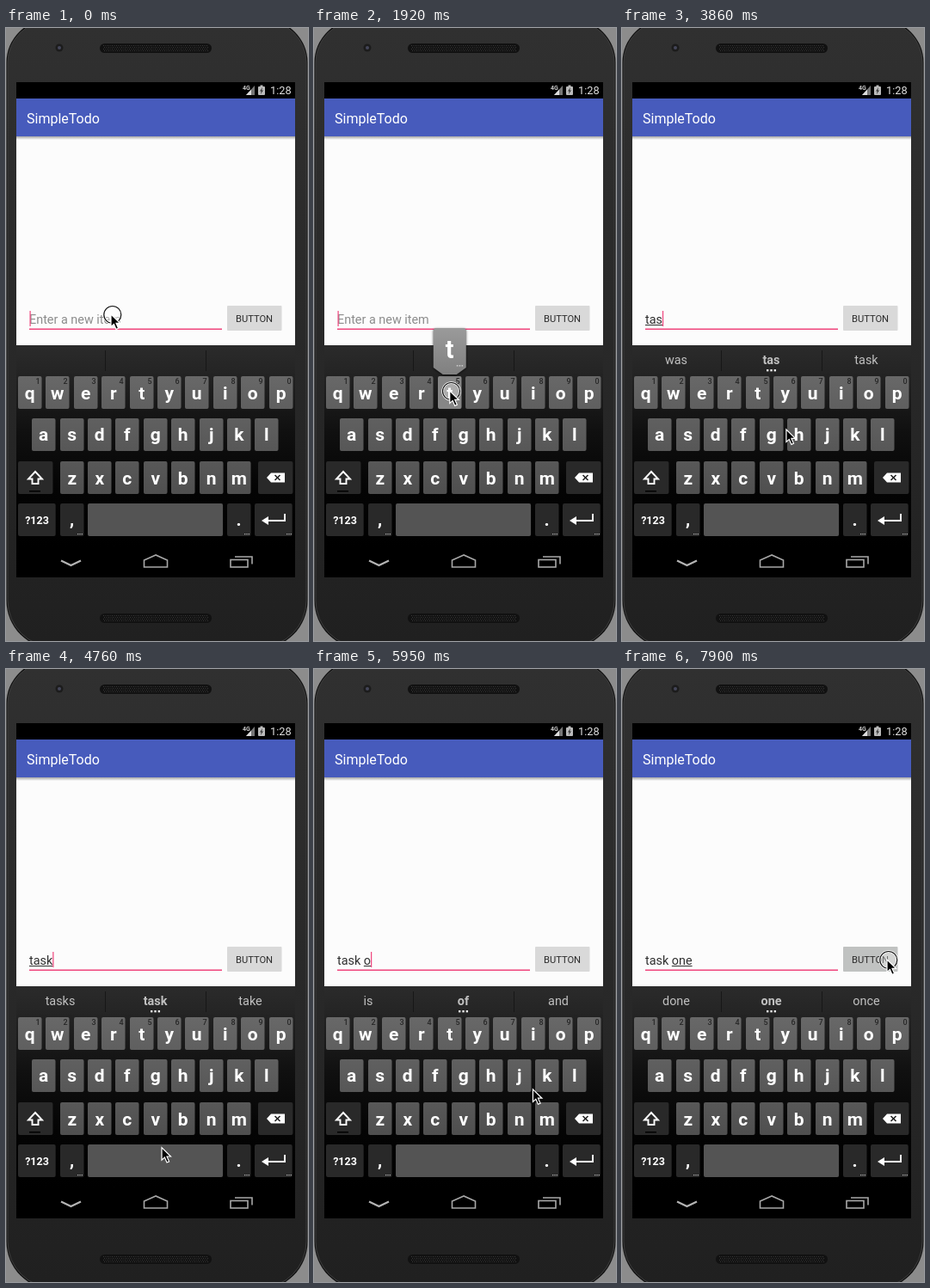
An HTML page with a canvas for the animation above (8 s loop, 351x713 px).

```html
<!DOCTYPE html>
<html lang="en">
<head>
<meta charset="utf-8">
<title>Todo entry</title>
<style>
html, body { margin: 0; width: 351px; height: 713px; overflow: hidden; background: #8c8c8c; }
canvas { display: block; }
</style>
</head>
<body>
<canvas id="stage" width="351" height="713"></canvas>
<script>
const c = document.getElementById('stage').getContext('2d');
const LOOP = 8000, STEP = 149, LAST = 53;
const PITCH = 32.4, KEY_W = 27.5, KEY_H = 38;
const PINK = '#f0447c', INK = '#303030';

// Pointer stops; those between whole steps leave no visible press.
const stops = [
  [0, 'field'], [8.5, 'rest'], [13, 't'], [20, 'a'], [25, 's'], [29, 'k'],
  [33, ' '], [39, 'o'], [41.8, 'n'], [47, 'e'], [51.5, 'past'], [53, 'button']
];
const spots = { field: [122, 333], rest: [115, 489], past: [332, 337], button: [308, 338] };
const suggestions = {
  '': '', t: 'the t to', ta: 'to ta at', tas: 'was tas task', task: 'tasks task take',
  'task ': 'is of and', 'task o': 'is of and', 'task on': 'in on one', 'task one': 'done one once'
};

const keyX = col => Math.round(14 + col * PITCH);
const keyY = row => Math.floor(405 + row * 49.5);
const spanW = span => (span - 1) * PITCH + KEY_W;

const letters = ['qwertyuiop', 'asdfghjkl', 'zxcvbnm'].flatMap((chars, row) =>
  [...chars].map((char, i) => ({ char, row, i, x: keyX((10 - chars.length) / 2 + i), y: keyY(row) })));

// Lower rows are touched nearer to their top edge.
const aim = (x, row) => [x + 2 * row, keyY(row) + 17 - 4 * row];
for (const k of letters) spots[k.char] = aim(k.x + KEY_W / 2, k.row);
spots[' '] = aim(keyX(2.5) + spanW(5) / 2, 3);

function box(x, y, w, h, fill, r = 0) {
  c.fillStyle = fill;
  c.beginPath();
  c.roundRect(x, y, w, h, r);
  c.fill();
}
function poly(points, { fill, stroke, width = 1.6, open = false }) {
  c.beginPath();
  points.forEach(([x, y]) => c.lineTo(x, y));
  if (!open) c.closePath();
  if (fill) { c.fillStyle = fill; c.fill(); }
  if (stroke) { c.strokeStyle = stroke; c.lineWidth = width; c.stroke(); }
}
// Completes a left half, given as offsets from the axis, into a symmetric outline.
function mirror(cx, y, half) {
  const side = sign => half.map(([dx, dy]) => [cx + sign * dx, y + dy]);
  return [...side(-1), ...side(1).reverse()];
}
function text(s, x, y, size, color, { align = 'left', weight = 400 } = {}) {
  c.font = `${weight} ${size}px Roboto, sans-serif`;
  c.textAlign = align;
  c.fillStyle = color;
  c.fillText(s, x, y);
  return c.measureText(s).width;
}
const bold = { align: 'center', weight: 700 };

function fade(y0, y1, ...colors) {
  const g = c.createLinearGradient(0, y0, 0, y1);
  colors.forEach((color, i) => g.addColorStop(i / (colors.length - 1), color));
  return g;
}
function dots(x, y, size, color) {
  for (let i = 0; i < 3; i++) box(x + i * size * 1.8, y, size, size, color);
}

function speaker(y) {
  box(109, y, 130, 11, '#111', 5.5);
  for (let row = 0; row < 4; row++)
    for (let x = 113 + row % 2; x < 235; x += 2.5) box(x, y + 2 + row * 2, 1, 1, '#393939');
}

function phone() {
  box(0, 0, 351, 713, '#8c8c8c');
  box(0.5, -10, 350, 732, '#111', [50, 50, 56, 56]);
  box(2, -8, 347, 728, fade(0, 713, '#303030', '#292929', '#202020'), [48, 48, 54, 54]);
  c.strokeStyle = '#3d3d3d';
  c.lineWidth = 1;
  c.stroke();
  box(57.5, 18.5, 9, 9, '#1c1c1c', 5);
  box(60, 21, 4, 4, '#45475a', 2);
  speaker(18);
  speaker(681);
}

function statusBar() {
  text('4G', 275, 72, 7, '#ccc', { weight: 700 });
  poly([[279, 78], [289, 78], [289, 67]], { fill: '#777' });
  poly([[279, 78], [285, 78], [285, 71.5]], { fill: '#ddd' });
  box(293, 68, 8, 10, '#bbb', 1);
  box(295.5, 66.5, 3, 2, '#bbb');
  poly([[298, 69], [295, 74], [297, 73], [296, 77], [299, 72], [297, 73]], { fill: '#111' });
  text('1:28', 307, 77, 12.8, '#e0e0e0');
}

function screen(pressed) {
  box(12, 63, 324, 576, '#000');
  box(12, 126, 324, 243, '#fcfcfc');
  box(12, 126, 324, 4, fade(126, 130, '#a5a5a5', '#fcfcfc'));
  box(12, 82, 324, 44, '#475bbc');
  text('SimpleTodo', 24, 111, 16, '#fff');
  statusBar();
  box(257, 323, 63.5, 29, pressed ? '#c0c2c1' : '#d9d9d9', 1);
  text('BUTTON', 288.5, 342, 11.2, '#2c2c2c', { align: 'center' });
}

function field(n, typed, since) {
  const cut = typed.indexOf(' ') + 1;
  let x = 27;
  if (!typed) text('Enter a new item', x, 344, 14.4, '#8c8c8c');
  x += text(typed.slice(0, cut), x, 344, 14.4, INK);
  const w = text(typed.slice(cut), x, 344, 14.4, INK);
  box(x, 345, w, 1, INK);
  box(27, 349.5, 224, 1.5, PINK);
  if ((n - since) * STEP % 1000 < 500) box(Math.max(x + w, 27.5), 329, 1.2, 18, PINK);
}

function key(x, row, span, fill) {
  box(x, keyY(row), spanW(span), KEY_H, fill, 2);
}

function popup({ char, x, y }) {
  const cx = x + KEY_W / 2, t = y - 56;
  c.save();
  c.shadowColor = '#000a';
  c.shadowBlur = 3;
  c.shadowOffsetY = 1;
  poly(mirror(cx, t, [[17, 0], [19, 2], [19, 46], [8, 54]]), { fill: fade(t, t + 54, '#9a9a9a', '#808080') });
  c.restore();
  text(char, cx, t + 35, 29, '#fff', bold);
  dots(cx + 8, t + 43, 1.6, '#c8c8c8');
}

function keyIcons() {
  const white = { stroke: '#fff', width: 1.9 };
  poly(mirror(34, 516, [[0, 0], [8, 8.5], [3.5, 8.5], [3.5, 14]]), white);
  box(27, 538, 13, 1.5, '#000');
  poly([[303, 523], [308, 517.5], [324, 517.5], [324, 528.5], [308, 528.5]], { fill: '#fff' });
  for (const d of [3, -3]) poly([[312.5, 523 - d], [318.5, 523 + d]], { stroke: '#222', open: true });
  poly([[324, 565], [324, 573], [303, 573]], { ...white, open: true });
  poly([[297, 573], [305, 568], [305, 578]], { fill: '#fff' });
  text('?123', 36, 577, 12.5, '#fff', bold);
  text(',', 76.5, 578, 21, '#fff', bold);
  text('.', 270.5, 579, 21, '#fff', bold);
  for (const x of [83, 277, 326]) dots(x, 588, 1.3, '#aaa');
}

function navBar() {
  const line = { stroke: '#a8a8a8' };
  poly([[64, 619.5], [75.5, 625], [87, 619.5]], { stroke: '#b4b4b4', width: 2.2, open: true });
  poly(mirror(174, 613, [[0, 0], [13.5, 6], [13.5, 14]]), line);
  c.strokeRect(261, 618.5, 20, 8.5);
  poly([[266, 615], [286, 615], [286, 623.5]], { ...line, open: true });
}

function keyboard(tap, words) {
  box(12, 369, 324, 33, fade(369, 402, '#2b2b2b', '#242424'));
  box(12, 402, 324, 202, fade(402, 604, '#232323', '#101010', '#040404', '#000'));
  for (const x of [115, 232]) box(x, 375, 1, 24, '#171717');
  words.forEach((w, i) => text(w, 63 + i * 110.5, 391, 14.4, '#c0c0c0', { align: 'center', weight: i === 1 ? 700 : 400 }));
  if (words[1]) dots(168, 397, 2.4, '#e8e8e8');

  for (const { char, row, i, x, y } of letters) {
    const tone = 104 - row * 8;
    key(x, row, 1, char === tap ? '#868686' : fade(y, y + KEY_H, `rgb(${tone} ${tone} ${tone})`, `rgb(${tone - 9} ${tone - 9} ${tone - 9})`));
    text(char, x + KEY_W / 2, y + 27 - row % 2, 21, '#fff', bold);
    if (row === 0) text((i + 1) % 10, x + KEY_W - 2, y + 9, 9, '#272727', { align: 'right', weight: 500 });
  }
  for (const [col, row, span] of [[0, 2, 1.4], [8.6, 2, 1.4], [0, 3, 1.5], [1.5, 3, 1], [7.5, 3, 1], [8.5, 3, 1.5]])
    key(keyX(col), row, span, '#292929');
  key(keyX(2.5), 3, 5, tap === ' ' ? '#868686' : '#545454');
  keyIcons();
  navBar();

  const held = letters.find(k => k.char === tap);
  if (held) popup(held);
}

function pointer(n, tapped) {
  const i = Math.max(1, stops.findIndex(([step]) => step >= n));
  const [[n0, from], [n1, to]] = [stops[i - 1], stops[i]];
  const eased = 1 - (1 - (n - n0) / (n1 - n0)) ** 3;
  const [x, y] = spots[from].map((v, axis) => v + (spots[to][axis] - v) * eased);
  if (tapped) {
    c.beginPath();
    c.arc(x + 1.8, y + 0.5, 10, 0, 7);
    c.fillStyle = '#ffffff50';
    c.fill();
    for (const [color, width] of [['#fff', 2.6], ['#111', 1.2]]) {
      c.strokeStyle = color;
      c.lineWidth = width;
      c.stroke();
    }
  }
  const arrow = [[0, 0], [0, 14.5], [3.4, 11.4], [6, 17.4], [8.6, 16.3], [6, 10.4], [10.5, 10.4]];
  poly(arrow.map(([dx, dy]) => [x + dx, y + dy]), { fill: '#000', stroke: '#fff', width: 1.2 });
}

function draw(now) {
  const n = Math.min(LAST, Math.floor((now % LOOP + 24) / STEP));
  const typedStops = stops.filter(([step, name]) => step < n && name.length === 1);
  const typed = typedStops.map(s => s[1]).join('');
  const since = typed ? Math.ceil(typedStops.at(-1)[0] + 0.1) : -1;
  const tap = stops.find(([step]) => step === n)?.[1];
  phone();
  screen(tap === 'button');
  field(n, typed, since);
  keyboard(tap, suggestions[typed].split(' '));
  pointer(n, tap);
}

const begin = performance.now();
function tick() {
  draw(performance.now() - begin);
  requestAnimationFrame(tick);
}
tick();
</script>
</body>
</html>
```
